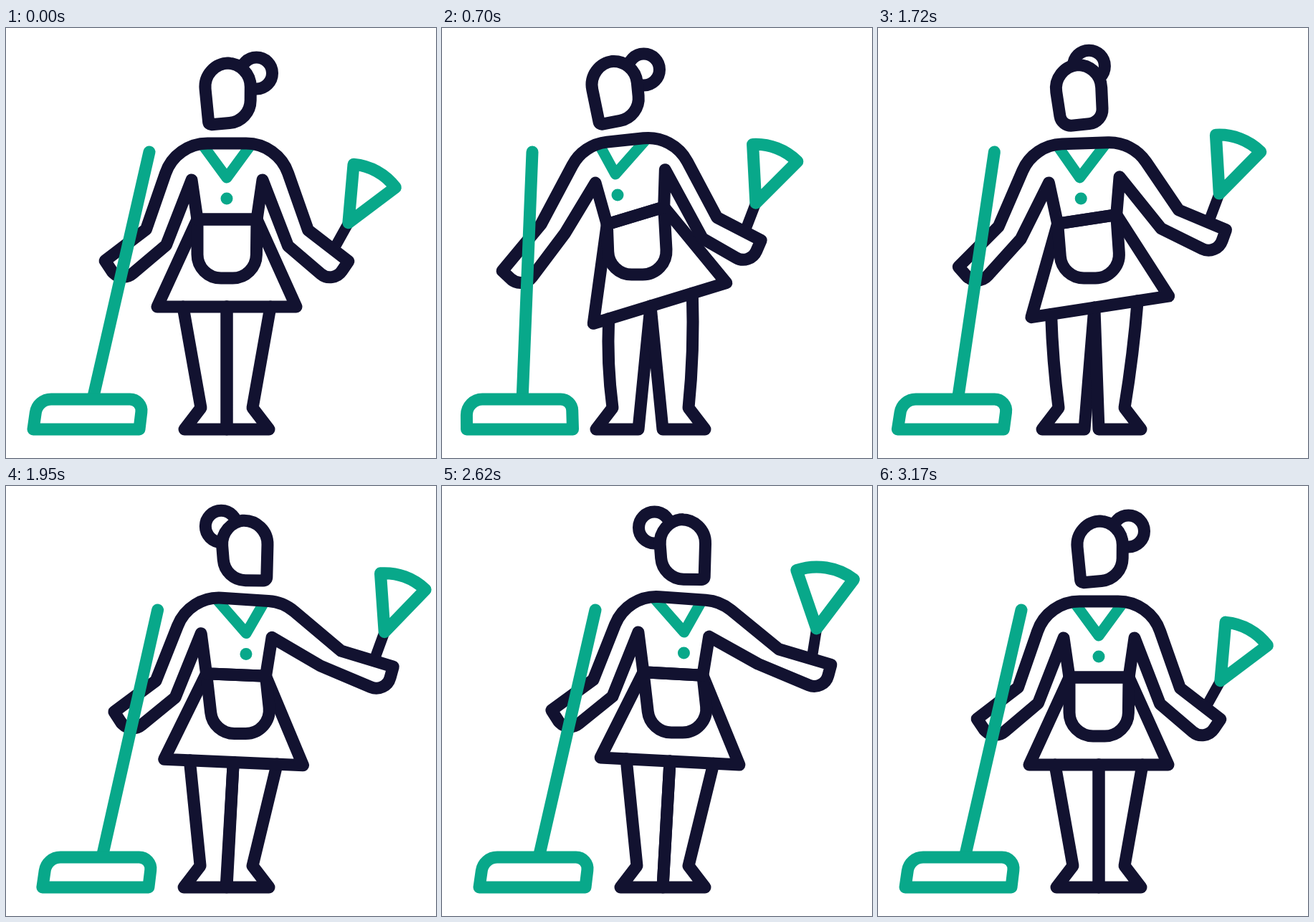
Recreate the animation shown at these times as an HTML page with a canvas. Size 600x600 px, loop 3200 ms.

```html
<!DOCTYPE html>
<html>
<head>
<meta charset="utf-8">
<style>
html, body { margin: 0; width: 100%; height: 100%; overflow: hidden; background: #fff; }
canvas { display: block; width: 600px; height: 600px; }
</style>
</head>
<body>
<canvas width="600" height="600"></canvas>
<script>
const ctx = document.querySelector('canvas').getContext('2d');
const LOOP = 3200, DARK = '#121230', GREEN = '#08a88a';
const MID = 308, NECK = 161, HEM = 389, FLOOR = 560;

const lerp = (a, b, f) => a + (b - a) * f;
const between = (a, b, f) => [lerp(a[0], b[0], f), lerp(a[1], b[1], f)];
const span = (t, a, b) => Math.min(1, Math.max(0, (t - a) / (b - a)));
const smooth = f => f * f * (3 - 2 * f);
const ease = (t, a, b) => smooth(span(t, a, b));
const hump = (t, a, b) => Math.sin(Math.PI * span(t, a, b));
const rad = deg => deg * Math.PI / 180;
const rotate = (x, y, deg) => {
  const c = Math.cos(rad(deg)), s = Math.sin(rad(deg));
  return [x * c - y * s, x * s + y * c];
};
const add = (p, q) => [p[0] + q[0], p[1] + q[1]];

function ink(color, width = 17) {
  ctx.strokeStyle = color;
  ctx.lineWidth = width;
  ctx.stroke();
}

// Line through points [x, y, corner radius].
function trace(points, closed) {
  const last = points[points.length - 1];
  const list = closed ? points : points.slice(1);
  ctx.beginPath();
  ctx.moveTo(...(closed ? between(last, points[0], 0.5) : points[0]));
  list.forEach(([x, y, r = 0], i) => {
    const next = list[i + 1] || (closed && between(last, points[0], 0.5));
    if (r && next) ctx.arcTo(x, y, next[0], next[1], r);
    else ctx.lineTo(x, y);
  });
  if (closed) ctx.closePath();
}

function line(points, color, width) {
  trace(points);
  ink(color, width);
}

function shape(points, color, fill) {
  trace(points, true);
  if (fill) { ctx.fillStyle = fill; ctx.fill(); }
  ink(color);
}

function draw(t) {
  // Three moves: lean over to mop, turn to dust, return.
  const toMop = ease(t, 0, 500), toDust = ease(t, 1500, 2000), back = ease(t, 2685, 3170);
  const mopping = toMop - toDust, dusting = toDust - back;
  const pose = (rest, mop, dust) => rest + mopping * mop + dusting * dust;

  const bob = 5 * (hump(t, 0, 500) + hump(t, 1500, 2000) + hump(t, 2685, 3170));
  const lift = 15 * hump(t, 0, 500);
  const scrub = t > 500 && t < 1500 ? (1 - Math.cos(2 * Math.PI * (t - 500) / 500)) / 2 : 0;
  const wave = Math.sin(3 * Math.PI * span(t, 2000, 2740)) ** 2;

  const hips = pose(0, -4, 10), lean = pose(0, -44, 5);
  const neckTilt = pose(0, -6, 4), hemTilt = pose(0, -17, 3);
  const drop = pose(0, -5, -5), front = pose(0, -20, 15), step = pose(0, -34, 0);

  // Bends the upright trunk: shift and tilt depend on the height.
  function place(x, y, r) {
    const u = (y - NECK) / (HEM - NECK);
    const tilt = lerp(neckTilt, hemTilt, smooth(Math.min(1, 2 * Math.abs(u))));
    const [dx, dy] = rotate(x - MID, 0, tilt);
    return [MID + hips + lean * (1 - u * u) + dx, y + drop + bob + dy, r];
  }

  function leg(side, stride) {
    const hip = place(MID + side * 61 + 0.4 * step, HEM);
    const ankle = [MID + side * 36 + stride, 530];
    const knee = between(hip, ankle, 0.5);
    ctx.beginPath();
    ctx.moveTo(...hip);
    ctx.quadraticCurveTo(knee[0] - side * step * 0.16, knee[1], ...ankle);
    ctx.lineTo(MID + side * 59 + stride, FLOOR);
    ctx.lineTo(MID + stride, FLOOR);
    ctx.lineTo(...place(MID + 0.4 * step, HEM));
    ink(DARK);
  }

  function arm(side, elbow, hand) {
    const slope = Math.atan2(hand[1] - elbow[1], side * (hand[0] - elbow[0])) * 180 / Math.PI;
    const reach = (r, turn) => {
      const [x, y] = rotate(r, 0, slope + turn);
      return add(hand, [side * x, y]);
    };
    return {
      outer: add(elbow, rotate(side * 14, -11, hemTilt)),
      inner: add(elbow, rotate(side * -14, 11, hemTilt)),
      tip: reach(22.5, -57),
      palm: [...reach(25, 52), 20]
    };
  }

  ctx.fillStyle = '#fff';
  ctx.fillRect(0, 0, 600, 600);
  ctx.lineCap = ctx.lineJoin = 'round';

  leg(-1, step);
  leg(1, 0);

  // Dress
  const waist = [place(267, 267), place(350, 267)];
  shape([waist[0], place(211, HEM), place(405, HEM), waist[1]], DARK);
  const pocket = add(place(MID, 349), [front * 0.8, 0]);
  line([waist[0], [...add(pocket, [-41, 0]), 33], [...add(pocket, [41, 0]), 33], waist[1]], DARK);
  const lapel = x => add(place(x, 164), [front * 0.4, 0]);
  line([lapel(275), add(place(MID, 209), [front, 0]), lapel(341)], GREEN, 15);
  ctx.fillStyle = GREEN;
  ctx.beginPath();
  ctx.arc(...add(place(MID, 238), [front, 0]), 8.5, 0, 7);
  ctx.fill();

  const right = arm(1, [pose(407.5, -34, 48), pose(293, -14, -55) + bob],
    [pose(456.5, -31, 68.5), pose(332.5, -25.5, -69.5) + bob]);
  // The mopping hand follows the lifted pole.
  const left = arm(-1, [pose(209.5, -54.5, 15), pose(292, -12, -10) + bob],
    [pose(159.5, -53, 14.5) - lift / 2, pose(332, 9, -11.5) + bob - lift * 0.83]);

  // Duster
  const tilt = 29 - 8 * toMop - toDust + 9 * back - 11 * wave;
  const half = 24 + 4 * wave, r = 58 + half;
  const grip = between(right.outer, right.tip, 0.63);
  const fanTip = add(grip, rotate(0, -43, tilt));
  line([grip, fanTip], DARK, 15);
  ctx.beginPath();
  ctx.moveTo(...fanTip);
  ctx.arc(...fanTip, r, rad(tilt - half - 90), rad(tilt + half - 90));
  ctx.closePath();
  ink(GREEN);

  // Blouse and arms; the shoulders look narrower when turned.
  const shoulder = 71 - 0.4 * Math.abs(front);
  shape([left.tip, left.outer, place(MID - shoulder, NECK, 62), place(MID + shoulder, NECK, 62),
    right.outer, right.tip, right.palm, right.inner, place(358, 212), waist[1],
    waist[0], place(259, 212), left.inner, left.palm], DARK);

  // Head: the chin moves from one side to the other, the bun hops over.
  const face = [MID + hips + lean + front, 90 + drop / 2 + bob];
  const bunSide = 1 - 2 * ease(t, 1520, 2040) + 2 * back;
  ctx.beginPath();
  ctx.arc(face[0] + 41.5 * bunSide, face[1] - 27 + drop / 2 - 11 * (1 - bunSide ** 2), 22, 0, 7);
  ink(DARK);
  const corner = (x, y, round) => [...add(face, rotate(x, y, pose(0, -6, -4))), round];
  const jaw = (side, f) => corner(side * lerp(25, 33, f), lerp(45, 40, f), lerp(4, 32, f));
  shape([corner(-33.5, -41, 33), corner(33.5, -41, 33), jaw(1, 1 - dusting), jaw(-1, dusting)], DARK, '#fff');

  // Mop: the head skews with the stroke.
  const x = 38 - 28 * ease(t, 0, 430) + 42 * toDust - 14 * back + 27 * scrub;
  const skew = 6 + mopping - 8 * scrub;
  const floor = FLOOR - lift, top = floor - 42;
  line([[pose(200, -74, 14), 173 - lift * 0.58], [x + 78 + skew, top - 4]], GREEN);
  shape([[x, floor], [x + skew, top, 22], [x + 147 + skew, top, 16], [x + 148, floor]], GREEN);
}

function frame() {
  draw(performance.now() % LOOP);
  requestAnimationFrame(frame);
}
frame();
</script>
</body>
</html>
```
